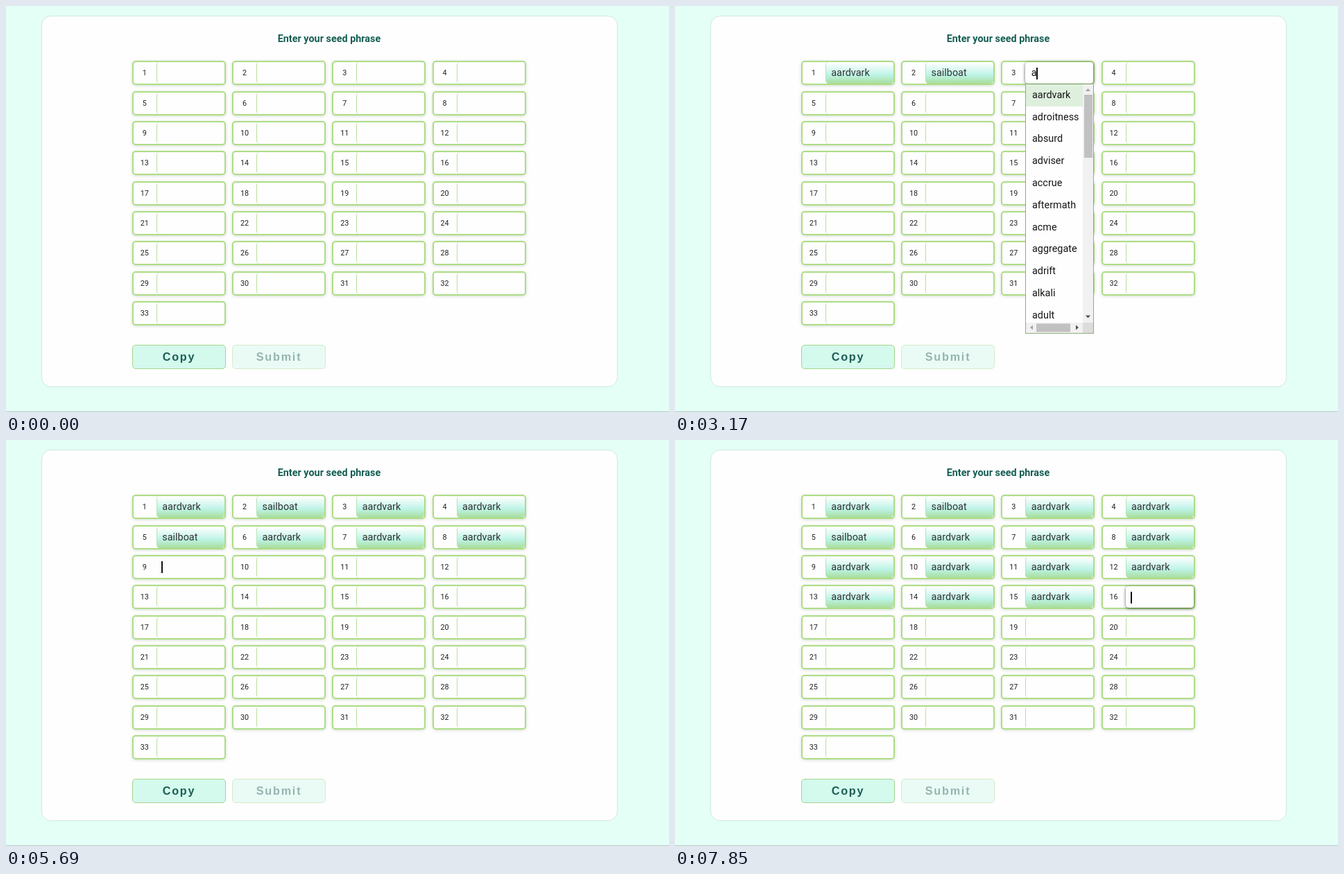
Animation, 956 px wide and 586 px high, one loop 8 s. Source, as an HTML page:

```html
<!DOCTYPE html>
<html lang="en">
<head>
<meta charset="utf-8">
<title>Seed phrase</title>
<style>
  * { box-sizing: border-box; }
  html, body { margin: 0; width: 100%; height: 100%; overflow: hidden; background: #e4fff6; }
  body { position: relative; font: 14.4px Roboto, sans-serif; }
  body div, body svg { position: absolute; }
  .floor { left: 0; top: 585px; width: 100%; height: 1px; background: #b4c8c1; }
  .card { left: 51px; top: 14px; width: 831px; height: 536px; background: #fefefe;
    border: 1px solid #d3e8df; border-radius: 14px; }
  .title { left: 182px; top: 38px; width: 568px; line-height: 20px; text-align: center;
    font-weight: 700; color: #155e54; }
  .cell { width: 135px; height: 35px; background: #fefefe; border: 2px solid #addd85;
    border-radius: 5px; box-shadow: 0 1px 4px rgba(60, 90, 50, .22); }
  .num { left: 0; top: 0; width: 32px; line-height: 31px; text-align: center;
    font-size: 10.8px; color: #222; }
  .field { left: 33px; top: 0; width: 98px; height: 31px; padding-left: 7.5px;
    line-height: 31px; color: #111; border-left: 1px solid #b9e09b;
    border-radius: 4.5px; white-space: pre; }
  .field.focus { background: #fefefe; border-color: transparent; }
  .field.done { color: #333; border-color: #b5e5b5;
    background: linear-gradient(#fff 3%, #bdf3e6 60%, #a9dd9c); }
  .caret { top: 7px; width: 2px; height: 17px; background: #111; }
  .button { top: 489px; width: 135px; height: 35px; line-height: 32px; text-align: center;
    font: 700 16.2px/32px "Liberation Sans", Arial, sans-serif; letter-spacing: 1.8px;
    color: #1c5f54; background: #d4f9ed; border: 1px solid #a3d68c; border-radius: 5px; }
  .list { width: 99px; height: 360px; overflow: hidden; background: #fefefe;
    border: 1px solid #9b9f9b; border-top: 0; border-bottom-color: #8fae7f; color: #161616; }
  .item { left: 0; width: 82px; height: 31.8px; padding-left: 9px; line-height: 32px; overflow: hidden; }
  .item:first-child { background: #def0dd; }
  .list svg { left: -1px; top: 0; }
</style>
</head>
<body>
<div class="floor"></div>
<div class="card"></div>
<div class="title">Enter your seed phrase</div>
<div class="button" style="left:182px">Copy</div>
<div class="button" style="left:326px;opacity:.46">Submit</div>
<script>
const LOOP = 8000, FIRST_FOCUS = 1260, FADE = 250, BLINK = 530;

// When each field's list opens, and when its first word is accepted.
const steps = [
  [2060, 2130], [2670, 2820], [3170, 3300], [3650, 3720], [4140, 4280],
  [4890, 5020], [5290, 5420], [5560, 5690], [5820, 5950], [6150, 6280],
  [6410, 6480], [6620, 6690], [6750, 6820], [6970, 7040], [7520, 7650]
];
const words = {
  a: "aardvark adroitness absurd adviser accrue aftermath acme aggregate adrift alkali adult".split(" "),
  s: "sailboat sawdust scallion scenic scorecard Scotland seabird select sentence shadow shamrock".split(" ")
};
const letterOf = i => i === 1 || i === 4 ? "s" : "a";

function add(parent, cls, text = "") {
  const el = document.createElement("div");
  el.className = cls;
  el.textContent = text;
  parent.append(el);
  return el;
}

function place(el, x, y) {
  el.style.left = x + "px";
  el.style.top = y + "px";
}

const cellX = i => 181.8 + 144.25 * (i % 4);
const cellY = i => 79.4 + 43.3 * Math.floor(i / 4);

const fields = Array.from({ length: 33 }, (_, i) => {
  const cell = add(document.body, "cell");
  place(cell, cellX(i), cellY(i));
  add(cell, "num", i + 1);
  return add(cell, "field");
});

const caret = add(document.body, "caret");

const scrollbars = `<svg width="99" height="360">
  <path fill="#f1f1f1" d="M83 0h15v344h-15zM1 344h82v15H1z"/>
  <path fill="#dcdcdc" d="M83 344h15v15h-15z"/>
  <path fill="#c1c1c1" d="M85 15h12v91h-12zM16 345.5h49v12H16z"/>
  <path fill="#a3a3a3" d="M87 10h7l-3.5-4zM11 347.5v7l-4-3.5z"/>
  <path fill="#505050" d="M87 333.5h7l-3.5 4zM73 347.5v7l4-3.5z"/>
</svg>`;

const lists = {};
for (const letter in words) {
  const list = lists[letter] = add(document.body, "list");
  words[letter].forEach((word, k) => place(add(list, "item", word), 0, 31.8 * k));
  list.insertAdjacentHTML("beforeend", scrollbars);
}

function drawField(field, i, t) {
  const focusAt = i ? steps[i - 1]?.[1] ?? LOOP : FIRST_FOCUS;
  const [openAt, doneAt] = steps[i] || [LOOP, LOOP];
  const letter = letterOf(i);
  const done = t >= doneAt, focused = t >= focusAt && !done, open = t >= openAt && !done;

  field.className = "field" + (done ? " done" : focused ? " focus" : "");
  field.textContent = done ? words[letter][0] : open ? letter : "";
  field.style.boxShadow = "none";
  if (!focused) return;

  const rest = 1 - Math.min(1, (t - focusAt) / FADE);
  field.style.boxShadow = `0 1px 4px rgba(25, 45, 20, ${0.75 * (1 - rest * rest)})`;

  const since = t - (open ? openAt : focusAt);
  caret.style.display = since % (2 * BLINK) < BLINK ? "block" : "none";
  place(caret, cellX(i) + (open ? 51 : 42.6), cellY(i) + 9.3);

  if (open) {
    lists[letter].style.display = "block";
    place(lists[letter], cellX(i) + 34.7, cellY(i) + 33.5);
  }
}

function draw(t) {
  caret.style.display = "none";
  for (const letter in lists) lists[letter].style.display = "none";
  fields.forEach((field, i) => drawField(field, i, t));
}

const start = performance.now();
function tick() {
  draw((performance.now() - start) % LOOP);
  requestAnimationFrame(tick);
}
tick();
</script>
</body>
</html>
```
